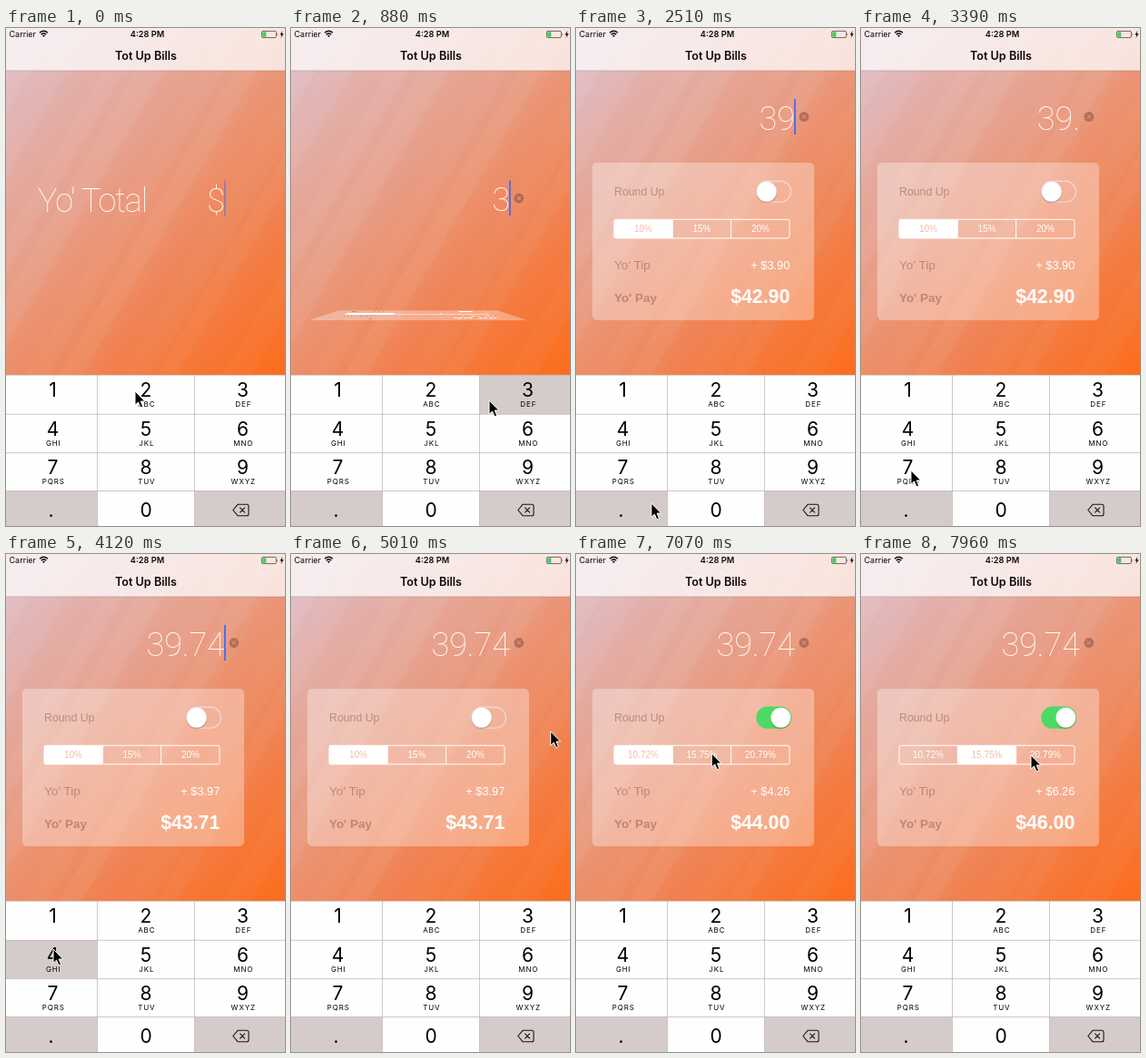
These frames come from a looping animation (307x547 px, 8 s). An HTML page:

```html
<!DOCTYPE html>
<html lang="en">
<head>
<meta charset="utf-8">
<title>Tot Up Bills</title>
<style>
html, body { margin: 0; width: 100%; height: 100%; overflow: hidden; background: #fff; }
svg { position: absolute; left: 0; top: 0; width: 307px; height: 547px; display: block; }
#card { left: 18px; top: 148px; width: 244px; height: 173px; transform-origin: 50% 100%; }
text { white-space: pre; }
.ui { font-family: Inter, "Liberation Sans", sans-serif; }
.thin { font: 100 36px Roboto, Lato, sans-serif; fill: #fff; }
#card text { font-family: "Liberation Sans", Arial, sans-serif; }
.mid { text-anchor: middle; }
.end { text-anchor: end; }
</style>
</head>
<body>
<svg viewBox="0 0 307 547">
  <defs>
    <linearGradient id="sky" gradientUnits="userSpaceOnUse" x1="0" y1="50" x2="300" y2="375">
      <stop offset="0" stop-color="#e0bac0"/>
      <stop offset=".35" stop-color="#e7a08b"/>
      <stop offset=".7" stop-color="#f08352"/>
      <stop offset="1" stop-color="#fc6c1b"/>
    </linearGradient>
    <clipPath id="view"><rect width="307" height="382"/></clipPath>
  </defs>
  <rect width="307" height="382" fill="url(#sky)"/>
  <g id="stripes" clip-path="url(#view)"></g>
  <rect width="307" height="47" fill="#fff" fill-opacity=".73"/>
  <rect y="46.5" width="307" height=".7" fill="#000" fill-opacity=".25"/>

  <g class="ui" fill="#0b0708">
    <text x="3.5" y="10" font-size="9">Carrier</text>
    <text x="155.5" y="10" font-size="9.2" font-weight="600" class="mid">4:28 PM</text>
    <text x="154" y="35" font-size="12.6" font-weight="600" class="mid">Tot Up Bills</text>
  </g>
  <g fill="none" stroke="#0b0708" stroke-width="1.3">
    <path d="M37 5.2Q41.5 1.2 46 5.2M38.7 7.2Q41.5 4.8 44.3 7.2"/>
    <path d="M40 8.4Q41.5 7.2 43 8.4L41.5 10Z" fill="#0b0708" stroke="none"/>
  </g>
  <rect x="281.4" y="3.4" width="16" height="7.2" rx="1.5" fill="none" stroke="#3a3230" stroke-width=".7"/>
  <rect x="282.3" y="4.3" width="4" height="5.4" rx=".5" fill="#3fd05d"/>
  <path d="M298.2 5.7q1.3 1.3 0 2.6z" fill="#3a3230"/>
  <path d="M304.3 3L301.4 7.5H303.3L302.5 11L305.6 6.3H303.6Z" fill="#0b0708"/>

  <text id="label" class="thin" x="35" y="201.5" letter-spacing="-1">Yo' Total</text>
  <g id="entry">
    <text id="amount" class="thin end" x="241" y="201.5"></text>
    <rect id="caret" x="240" y="167.5" width="1.8" height="39" fill="#416bf5"/>
    <g id="clear">
      <circle cx="250.8" cy="187" r="5.4" fill="#8f5244" fill-opacity=".6"/>
      <path d="M248.8 185l4 4m0-4l-4 4" stroke="#e9a287" stroke-width="1"/>
    </g>
  </g>
  <g id="pad"></g>
</svg>

<svg id="card" viewBox="18 148 244 173">
  <rect x="18" y="148" width="244" height="173" rx="5" fill="#fff" fill-opacity=".33"/>
  <g fill="#a0685c" fill-opacity=".62">
    <text x="42" y="184.3" font-size="12.3">Round Up</text>
    <text x="42" y="264.8" font-size="13.6">Yo' Tip</text>
    <text x="42" y="301" font-size="13.4" font-weight="700">Yo' Pay</text>
  </g>
  <rect id="track" x="199" y="168.3" width="37.5" height="22.8" rx="11.4" stroke-width="1.4"/>
  <ellipse id="shade" cy="181" rx="11.2" ry="11.2" fill="#000" fill-opacity=".18"/>
  <circle id="knob" cy="179.7" r="10.9" fill="#fff"/>
  <g id="segments"></g>
  <rect x="42" y="210.3" width="193" height="20.6" rx="2.5" fill="none" stroke="#fff"/>
  <path d="M106.3 210.5V231M170.6 210.5V231" stroke="#fff"/>
  <text id="tip" class="end" x="235.3" y="264.8" font-size="12.8" fill="#fff"></text>
  <text id="pay" class="end" x="235.3" y="302" font-size="21.3" font-weight="700" fill="#fff"></text>
</svg>

<svg viewBox="0 0 307 547">
  <path id="pointer" d="M0 0V15.2L3.5 12L6 17.8L8.6 16.7L6.2 11H10.8Z" fill="#000" stroke="#fff" stroke-width="1" stroke-linejoin="round"/>
</svg>

<script>
const LOOP = 8000, STEP = 147.1;
const $ = id => document.getElementById(id);
const clamp = x => Math.max(0, Math.min(1, x));
const smooth = x => (x = clamp(x)) * x * (3 - 2 * x);

function add(parent, tag, attrs, content) {
  const el = document.createElementNS('http://www.w3.org/2000/svg', tag);
  for (const k in attrs) el.setAttribute(k, attrs[k]);
  if (content) el.textContent = content;
  parent.appendChild(el);
  return el;
}
function set(id, attrs) {
  for (const k in attrs) $(id).setAttribute(k, attrs[k]);
}

// Slanted bands over the gradient
for (let i = 0; i < 15; i++) {
  const x = i * 36 - 10, w = 20 + 12 * Math.abs(Math.sin(i * 2.3));
  add($('stripes'), 'path', {
    d: `M${x} 0h${w}l-220 382h${-w}z`,
    fill: i % 3 ? '#fff' : '#f06a30',
    'fill-opacity': (0.035 + 0.02 * Math.sin(i * 1.7)).toFixed(3)
  });
}

// Keypad
const GREY = '#d4cbca', WHITE = '#fefefe';
const cols = [0, 100.5, 207.5, 307], rows = [381, 424, 466.5, 508.5, 547];
const centers = [51.5, 154, 260.5];
const letters = ['', 'ABC', 'DEF', 'GHI', 'JKL', 'MNO', 'PQRS', 'TUV', 'WXYZ'];
const keys = {};
[...'123456789.0<'].forEach((name, i) => {
  const c = i % 3, r = Math.floor(i / 3), x = centers[c];
  const rect = add($('pad'), 'rect', {
    x: cols[c], y: rows[r], width: cols[c + 1] - cols[c], height: rows[r + 1] - rows[r]
  });
  keys[name] = { rect, dark: name === '.' || name === '<' };
  if (name === '<') {
    add($('pad'), 'path', {
      d: 'M255 523.3H265Q267 523.3 267 525.3V533.7Q267 535.7 265 535.7H255L249.8 529.5ZM257.3 526.6l5.6 5.8m0-5.8l-5.6 5.8',
      fill: 'none', stroke: '#1a1515', 'stroke-width': 1.1, 'stroke-linejoin': 'round'
    });
    return;
  }
  const y = [405, 448, 490, 537.3][r];
  const style = { class: 'ui mid', fill: '#000' };
  add($('pad'), 'text', { ...style, x: name === '.' ? 49.5 : x, y, 'font-size': 21 }, name);
  if (letters[i]) {
    add($('pad'), 'text', { ...style, x: x + 0.8, y: y + 11.3, 'font-size': 8, 'letter-spacing': 0.9 }, letters[i]);
  }
});
add($('pad'), 'path', {
  d: 'M0 381.3H307M0 424.3H307M0 466.6H307M0 508.5H307M100.5 381V547M207.5 381V547',
  stroke: '#b9b2b1', 'stroke-width': 0.7
});

const rates = [0.1, 0.15, 0.2];
const segs = rates.map((_, i) => ({
  box: add($('segments'), 'rect', { x: 42 + i * 64.3, y: 210.3, width: 64.3, height: 20.6, fill: '#fff' }),
  text: add($('segments'), 'text', { class: 'mid', x: 74 + i * 64.5, y: 224.2, 'font-size': 10 })
}));

// Timeline
const entries = [[-600, '$'], [870, '3'], [2040, '39'], [2640, '39.'], [3520, '39.7'], [4110, '39.74']];
const presses = [['3', 870, 1000], ['.', 2640, 2900], ['7', 3520, 3660], ['4', 4110, 4250]];
const path = [
  [0, 142, 399], [295, 142, 399], [588, 218, 409], [1029, 218, 409], [1324, 185, 456],
  [1618, 214, 481], [1765, 222, 483], [2060, 220, 484], [2500, 83, 522], [2648, 62, 526],
  [2942, 60, 525], [3089, 60, 510], [3383, 55, 486], [3677, 54, 485], [3972, 52, 436],
  [4119, 52, 434], [4270, 52, 434], [4560, 130, 350], [4860, 270, 222], [5000, 286, 195],
  [5296, 220, 180], [5590, 208, 180], [6031, 222, 180], [6480, 222, 180], [6920, 160, 217],
  [7208, 138, 221], [7649, 129, 221], [7796, 152, 221], [7943, 187, 221], [8000, 187, 221]
];
const SWITCH = 5230, SEGMENT = 7340, UNFOLD = 882;

function along(t) {
  let i = 1;
  while (i < path.length - 1 && path[i][0] < t) i++;
  const a = path[i - 1], b = path[i], p = clamp((t - a[0]) / (b[0] - a[0]));
  return [a[1] + (b[1] - a[1]) * p, a[2] + (b[2] - a[2]) * p];
}

function drawCard(t, total) {
  const roundUp = t >= SWITCH, chosen = t >= SEGMENT ? 1 : 0;
  const payFor = r => roundUp ? Math.ceil(total * (1 + r)) : total * (1 + r);
  const pay = payFor(rates[chosen]);
  $('tip').textContent = '+ $' + (pay - total).toFixed(2);
  $('pay').textContent = '$' + pay.toFixed(2);
  segs.forEach((s, i) => {
    const on = i === chosen;
    s.box.setAttribute('fill-opacity', on ? 1 : 0);
    s.text.setAttribute('fill', on ? '#eebfa9' : '#fff');
    s.text.textContent = roundUp
      ? ((payFor(rates[i]) / total - 1) * 100).toFixed(2) + '%'
      : rates[i] * 100 + '%';
  });
  const slide = smooth((t - SWITCH) / 180), x = 209.8 + 15.5 * slide;
  set('track', {
    fill: '#4cd964', 'fill-opacity': slide,
    stroke: slide > 0.5 ? '#4cd964' : '#ead9d8'
  });
  set('knob', { cx: x });
  set('shade', { cx: x });
}

function draw(ms) {
  const t = Math.floor((ms + 10) / STEP) * STEP;
  const [since, value] = entries.filter(e => e[0] <= t).pop();
  const typed = value !== '$';
  const p = smooth((t - UNFOLD) / 435);

  $('label').style.display = typed ? 'none' : '';
  $('clear').style.display = typed ? '' : 'none';
  $('amount').textContent = value;
  set('entry', { transform: `translate(0 ${-89.5 * p})` });

  const blink = (t - since) % 1000;
  set('caret', { opacity: 1 - clamp((blink - 500) / 200) });

  const card = $('card');
  card.style.display = typed ? '' : 'none';
  card.style.transform = p < 1
    ? `scale(${0.98 + 0.02 * p}) perspective(470px) rotateX(${85 * (1 - p)}deg)` : 'none';
  if (typed) drawCard(t, parseFloat(value));

  for (const name in keys) {
    const down = presses.some(k => k[0] === name && t >= k[1] && t < k[2]);
    keys[name].rect.setAttribute('fill', keys[name].dark !== down ? GREY : WHITE);
  }
  const [x, y] = along(t);
  set('pointer', { transform: `translate(${x} ${y})` });
}

const start = performance.now();
function frame(now) {
  draw(Math.max(0, now - start) % LOOP);
  requestAnimationFrame(frame);
}
draw(0);
requestAnimationFrame(frame);
</script>
</body>
</html>
```
